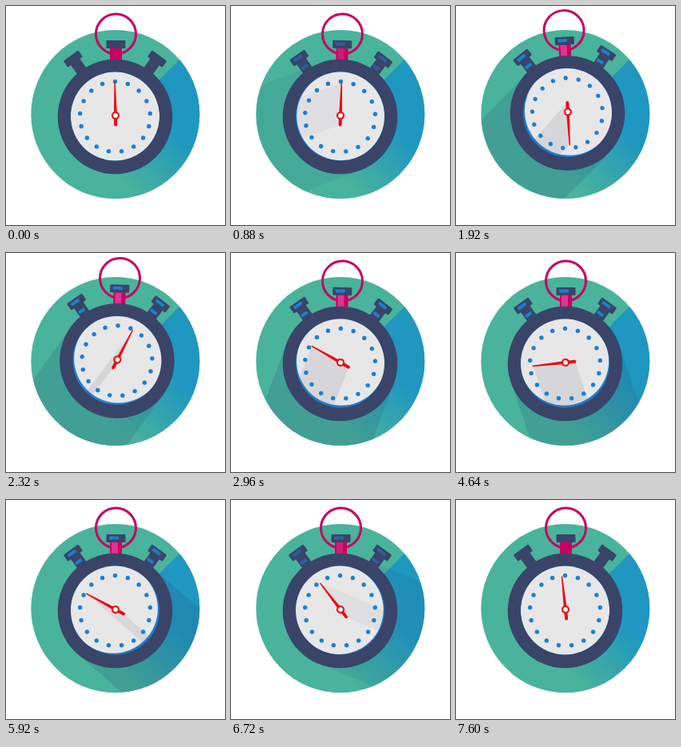
Write an HTML page that moves like this. It is 274 px wide and 274 px high and loops after 7.68 s.

```html
<!DOCTYPE html>
<html lang="en">
<head>
<meta charset="utf-8">
<title>Stopwatch</title>
<style>
  html, body { margin: 0; width: 100%; height: 100%; overflow: hidden; background: #fff; }
  svg { display: block; width: 100%; height: 100%; }
</style>
</head>
<body>
<svg viewBox="0 0 274 274">
  <defs>
    <linearGradient id="sky" gradientUnits="userSpaceOnUse" x1="122" y1="200" x2="189" y2="133">
      <stop offset="0" stop-color="#49b39b"/>
      <stop offset="1" stop-color="#1f97c0"/>
    </linearGradient>
    <clipPath id="discClip"><circle cx="136.8" cy="135.5" r="105.5"/></clipPath>
    <clipPath id="faceClip"><circle cx="136.5" cy="138" r="55.5"/></clipPath>
    <g id="button">
      <rect x="129.5" y="50" width="14" height="22" fill="#3a4468"/>
      <rect x="125" y="44" width="23" height="10" rx="1.5" fill="#3a4468"/>
      <g class="shine" fill="#1a80d2">
        <rect x="129" y="46.5" width="12" height="4" rx="1"/>
        <rect x="131" y="60" width="9" height="4"/>
      </g>
    </g>
  </defs>

  <g clip-path="url(#discClip)">
    <rect width="274" height="274" fill="#49b39b"/>
    <path d="M284 0L10 274H284Z" fill="url(#sky)"/>
    <path id="castShadow" stroke="#2a5f80" stroke-width="143"/>
  </g>

  <g id="watch">
    <circle cx="137.5" cy="35" r="25" fill="none" stroke="#c8005f" stroke-width="3"/>
    <use href="#button" transform="rotate(-36 136.5 138.5)"/>
    <use href="#button" transform="rotate(36 136.5 138.5)"/>
    <rect x="130" y="51" width="15" height="20" fill="#c8005f"/>
    <rect class="shine" x="132" y="53" width="8" height="14" fill="#e0358f"/>
    <rect x="125.5" y="43" width="24" height="10" rx="1" fill="#3a4468"/>
    <rect class="shine" x="129" y="45.5" width="12" height="4" rx="1" fill="#1a80d2"/>
    <circle cx="136.5" cy="138.5" r="71.8" fill="#3a4468"/>
    <g clip-path="url(#faceClip)">
      <rect x="80" y="80" width="114" height="116" fill="#1a80d2"/>
      <circle id="face" r="55.7" fill="#e7e7e8"/>
      <path id="handShadow" fill="#334"/>
    </g>
    <g id="dots" fill="#1a80d2"/>
    <g id="hand">
      <path d="M136.1 95.5Q136.8 94.5 137.5 95.5L139 137V148.5A2 2 0 0 1 135 148.5V137Z" fill="#ea0d14"/>
      <circle cx="137" cy="137" r="4" fill="#f3f3f3" stroke="#ea0d14" stroke-width="2.2"/>
    </g>
  </g>
</svg>
<script>
const LOOP = 7.68, STEP = 0.08, DOTS = 17;
const $ = id => document.getElementById(id);
const set = (el, attrs) => { for (const k in attrs) el.setAttribute(k, attrs[k]); };
const shines = document.querySelectorAll('.shine');

for (let i = 0; i < DOTS; i++) {
  const a = i / DOTS * 2 * Math.PI;
  const dot = document.createElementNS('http://www.w3.org/2000/svg', 'circle');
  set(dot, { cx: 136.5 + 44 * Math.sin(a), cy: 138.5 - 44 * Math.cos(a), r: 2.7 });
  $('dots').append(dot);
}

// Hand angle over time: slow start, fast spin, gentle finish.
const keys = [[0, -1], [0.88, 1], [1.92, 540], [2.96, 1019], [4.64, 1344], [5.92, 1379], [7.6, 1434], [7.68, 1439]];
const rate = i => (keys[i + 1][1] - keys[i][1]) / (keys[i + 1][0] - keys[i][0]);
const slope = i => {
  if (i === 0) return rate(0);
  if (i === keys.length - 1) return rate(i - 1);
  const a = rate(i - 1), b = rate(i);
  return 2 * a * b / (a + b);
};
function handAngle(t) {
  let i = 0;
  while (i < keys.length - 2 && t >= keys[i + 1][0]) i++;
  const [t0, a0] = keys[i], [t1, a1] = keys[i + 1];
  const h = t1 - t0, u = (t - t0) / h, v = 1 - u;
  return a0 * v * v * (1 + 2 * u) + a1 * u * u * (3 - 2 * u)
    + h * u * v * (v * slope(i) - u * slope(i + 1));
}

function draw(t) {
  const light = Math.max(0, Math.min(1, 1.6 * Math.sin(Math.PI * t / LOOP) - 0.1));

  // The light swings half a turn, so shadows sweep from left to right.
  const sweep = Math.PI * (0.5 - t / LOOP);
  const dx = -Math.sin(sweep), dy = Math.cos(sweep);
  set($('castShadow'), {
    d: `M136.5 138.5l${dx * 260} ${dy * 260}`,
    opacity: 0.24 * light
  });
  set($('face'), { cx: 136.5 - dx * 3.2 * light, cy: 138 - dy * 3.2 * light });
  shines.forEach(s => set(s, { opacity: light }));

  const angle = handAngle(t), rad = angle * Math.PI / 180;
  const sx = Math.sin(rad), sy = -Math.cos(rad);
  set($('hand'), { transform: `rotate(${angle} 137 137)` });
  set($('handShadow'), {
    d: `M${137 + 41 * sx} ${137 + 41 * sy}l${dx * 130} ${dy * 130}L${137 - 12 * sx + dx * 130} ${137 - 12 * sy + dy * 130}l${-dx * 130} ${-dy * 130}Z`,
    opacity: 0.09 * light
  });

  // The watch rattles while the hand spins fast.
  const s = t - 1.92;
  const shake = t > 0 && t < 4.04 ? Math.exp(-((s / 1.03) ** 2)) : 0;
  const tilt = -3 * shake * Math.cos(7 * Math.PI / 1.04 * s);
  const push = shake * Math.cos(5.5 * Math.PI / 1.04 * s);
  set($('watch'), { transform: `translate(${3 * push} ${-4.5 * push}) rotate(${tilt} 136.5 138.5)` });
}

const start = performance.now();
function tick() {
  const t = (performance.now() - start) / 1000 % LOOP;
  draw(Math.floor(t / STEP) * STEP);
  requestAnimationFrame(tick);
}
draw(0);
requestAnimationFrame(tick);
</script>
</body>
</html>
```
